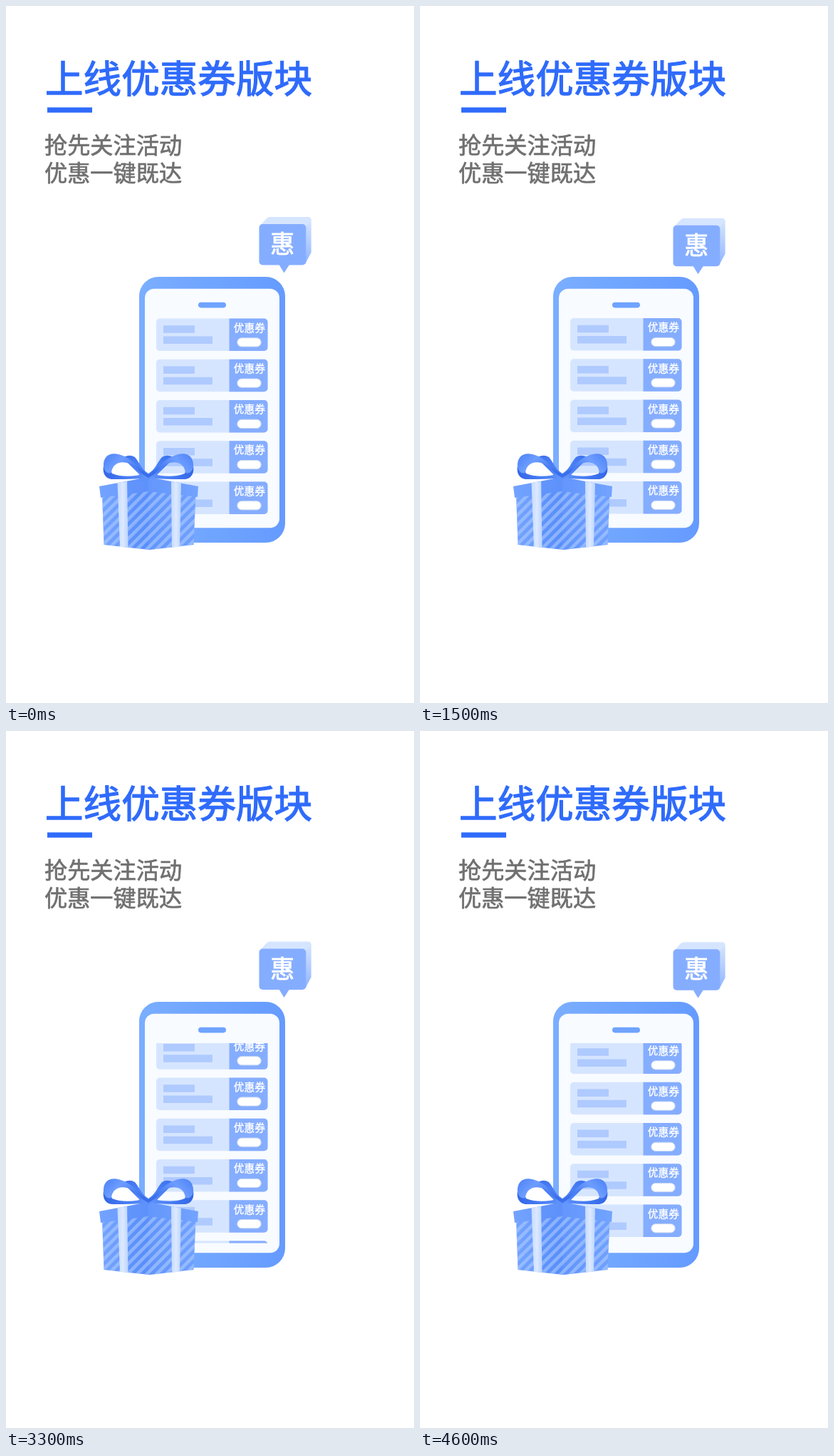
An HTML page that plays this animation: 573 px wide and 978 px high, repeating every 4.7 s.

```html
<!DOCTYPE html>
<html lang="zh-CN">
<head>
<meta charset="utf-8">
<style>
html, body { margin: 0; width: 100%; height: 100%; overflow: hidden; background: #fff; }
svg { display: block; width: 573px; height: 978px; }
text { font-family: "Noto Sans CJK SC", "Noto Sans CJK", sans-serif; }
.title { font-size: 53.6px; fill: #2f6bfb; stroke: #2f6bfb; stroke-width: 1.3px; }
.sub { font-size: 32.2px; fill: #707070; stroke: #707070; stroke-width: .7px; }
.label { font-size: 14.7px; fill: #fff; stroke: #fff; stroke-width: .4px; text-anchor: middle; }
.badge { font-size: 34px; fill: #fff; stroke: #fff; stroke-width: .9px; text-anchor: middle; }
</style>
</head>
<body>
<svg viewBox="0 0 573 978">
  <defs>
    <linearGradient id="phone"><stop stop-color="#7aaeff"/><stop offset="1" stop-color="#659bff"/></linearGradient>
    <linearGradient id="side" x1="0" y1="0" x2="0" y2="1"><stop stop-color="#d6e5ff"/><stop offset="1" stop-color="#8fb5ff"/></linearGradient>
    <linearGradient id="lid"><stop stop-color="#73a3ff"/><stop offset=".5" stop-color="#6496fc"/><stop offset="1" stop-color="#72a3ff"/></linearGradient>
    <linearGradient id="box"><stop stop-color="#73a3ff"/><stop offset=".48" stop-color="#6094fb"/><stop offset="1" stop-color="#70a1ff"/></linearGradient>
    <linearGradient id="strap"><stop stop-color="#c6dbff"/><stop offset=".5" stop-color="#dce9ff"/><stop offset="1" stop-color="#bcd4ff"/></linearGradient>
    <linearGradient id="band" x1="0" y1="0" x2="1" y2=".5"><stop stop-color="#4a80f6"/><stop offset=".4" stop-color="#6d9dff"/><stop offset="1" stop-color="#3a6fec"/></linearGradient>
    <linearGradient id="curl"><stop stop-color="#3467e6"/><stop offset=".6" stop-color="#4a7ff5"/><stop offset="1" stop-color="#6496fc"/></linearGradient>
    <linearGradient id="tail" x1="0" y1="0" x2="1" y2="1"><stop stop-color="#3b70ee"/><stop offset="1" stop-color="#5a8ffb"/></linearGradient>
    <pattern id="stripes" width="9.6" height="9.6" patternUnits="userSpaceOnUse" patternTransform="rotate(45 200 700)">
      <rect width="4.6" height="9.6" fill="#b4d0ff" opacity=".55"/>
    </pattern>
    <clipPath id="view"><rect x="211" y="438" width="157" height="280.5"/></clipPath>
    <g id="card">
      <rect x="211" width="156.5" height="45.5" rx="5" fill="#d6e5ff"/>
      <path d="M313.5 0h49a5 5 0 0 1 5 5v35.5a5 5 0 0 1-5 5h-49z" fill="#85adff"/>
      <path d="M221 9.7h44v10.5h-44zM221 25h69v10.5h-69z" fill="#afcaff"/>
      <text class="label" x="341.8" y="18.3">优惠券</text>
      <rect x="324.8" y="27.3" width="33.4" height="12.2" rx="6" fill="#fff" stroke="#cbd8ef"/>
    </g>
    <g id="loop">
      <path d="M164 634Q173 628 181 633C188 641 190 650 200 656V664L188 658Z" fill="url(#tail)"/>
      <path d="M138 641C134 654 139 664 150 664C168 664 184 664 200 662L196 656C182 660 164 662 149 656C146 650 149 643 154 638Z" fill="url(#curl)"/>
      <path d="M137 647C136 633 144 627 155 628.500C177 632 187 650 200 657V662C189 657 182 645 170 641C158 638 149 644 148 655C143 657 138 653 137 647Z" fill="url(#band)"/>
    </g>
  </defs>

  <rect width="573" height="978" fill="#fff"/>
  <text class="title" x="55" y="122">上线优惠券版块</text>
  <rect x="58" y="142.3" width="63" height="7.3" fill="#2f6bfb"/>
  <text class="sub" x="54" y="206.8">抢先关注活动</text>
  <text class="sub" x="54" y="245.6">优惠一键既达</text>

  <rect x="187" y="380" width="205" height="373" rx="27" fill="url(#phone)"/>
  <rect x="195" y="396.8" width="189" height="335.4" rx="13" fill="#f8fbff"/>
  <rect x="270" y="415.8" width="39" height="7.6" rx="3.8" fill="#6fa3ff"/>
  <g clip-path="url(#view)"><g id="list"></g></g>

  <g id="bubble">
    <path d="M356 309L366 298Q368 296 371 296H424Q428.500 296 428.500 300V346L420 362Z" fill="#d6e5ff"/>
    <path d="M421 309L428.500 299V346L420 362Z" fill="url(#side)"/>
    <rect x="355.500" y="306" width="65.800" height="57.500" rx="5" fill="#85adff"/>
    <path d="M383.500 363H398L390.500 374.500Z" fill="#85adff"/>
    <text class="badge" x="388.300" y="346">惠</text>
  </g>

  <g id="gift">
    <path d="M135 686L200 680L266.500 686L263.500 756L202 763L137.500 756Z" fill="url(#box)"/>
    <path d="M171 684L200 681V763L172 760Z" fill="#3f78f4" opacity=".2"/>
    <path d="M135 686L200 680L266.500 686L263.500 756L202 763L137.500 756Z" fill="url(#stripes)"/>
    <path d="M131 674L200 661L270 674L269 689L200 681L133 690Z" fill="url(#lid)"/>
    <path d="M171 667L200 661V681L171 685Z" fill="#4c84f8" opacity=".25"/>
    <path d="M156.500 669L170 667L171.500 760L160 759Z" fill="url(#strap)"/>
    <path d="M232 667L246 669.500L244 758.500L233 760Z" fill="url(#strap)"/>
    <use href="#loop"/>
    <use href="#loop" transform="translate(400 0) scale(-1 1)"/>
  </g>
</svg>
<script>
const LOOP = 4700, STEP = 100, CYCLE = 2400;
const PITCH = 57.23, FIRST_TOP = 438.5;
const scrollKeys = [0, -107.4, -127.6, -40.4, 0];
const bobKeys = [0, -2.3, 0, 2.3, 0];
const list = document.getElementById('list');
const bubble = document.getElementById('bubble');

for (let i = 0; i < 9; i++) {
  const card = document.createElementNS('http://www.w3.org/2000/svg', 'use');
  card.setAttribute('href', '#card');
  card.setAttribute('y', FIRST_TOP + i * PITCH);
  list.appendChild(card);
}

// cubic-bezier(.25, .1, .25, 1), solved by bisection
function ease(x) {
  const bezier = (s, a, b) => 3 * (1 - s) ** 2 * s * a + 3 * (1 - s) * s * s * b + s ** 3;
  let low = 0, high = 1;
  for (let i = 0; i < 24; i++) {
    const mid = (low + high) / 2;
    if (bezier(mid, .25, .25) < x) low = mid; else high = mid;
  }
  return bezier(low, .1, 1);
}

function valueAt(keys, time) {
  const position = (time % CYCLE) / CYCLE * (keys.length - 1);
  const i = Math.floor(position);
  return keys[i] + (keys[i + 1] - keys[i]) * ease(position - i);
}

function draw(now) {
  const time = Math.floor((now % LOOP) / STEP) * STEP;
  list.setAttribute('transform', `translate(0 ${valueAt(scrollKeys, time).toFixed(2)})`);
  bubble.setAttribute('transform', `translate(0 ${valueAt(bobKeys, time).toFixed(2)})`);
}

const start = performance.now();
function tick() {
  draw(performance.now() - start);
  requestAnimationFrame(tick);
}
tick();
</script>
</body>
</html>
```
